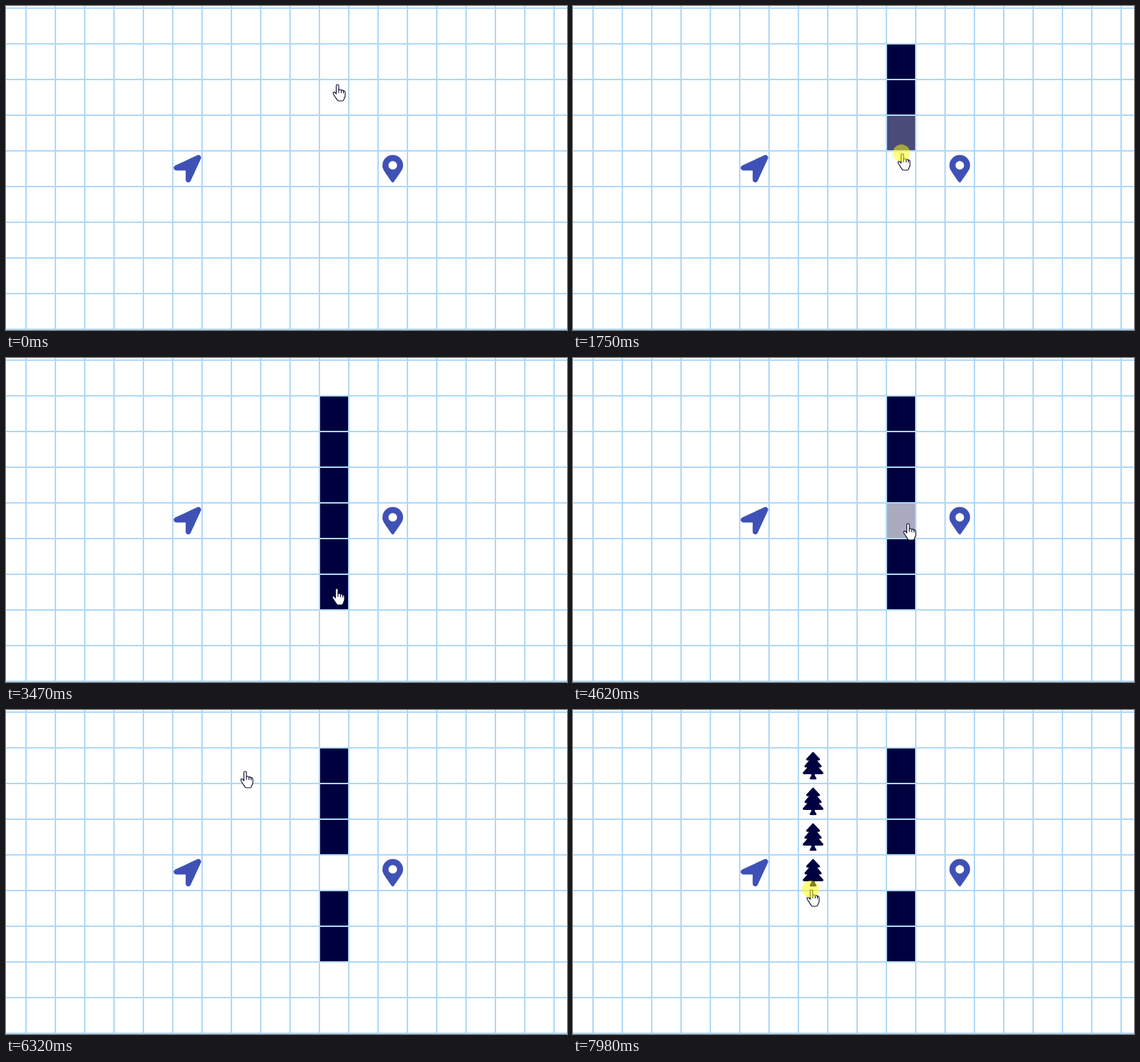
These frames come from a looping animation (784 px wide and 454 px high, 8000 ms). An HTML page:

```html
<!DOCTYPE html>
<html lang="en">
<head>
<meta charset="utf-8">
<title>Grid walls</title>
<style>
  html, body { margin: 0; width: 100%; height: 100%; overflow: hidden; background: #fff; }
  svg { display: block; }
</style>
</head>
<body>
<svg width="784" height="454" viewBox="0 0 784 454">
  <defs>
    <path id="tree" fill="#000040" transform="scale(.075)" d="M378 378L298 288h31c9 0 17-5 21-13s2-17-4-24L268 160h29c9 0 17-5 21-14s2-17-4-24L204 5c-6-6-18-6-24 0L70 122c-6 7-8 16-4 24s12 14 21 14h29l-79 91c-5 7-7 16-3 24s12 13 21 13h31L6 378c-6 7-8 17-4 25s12 13 21 13H160v24l-30 49c-5 10 2 23 14 23h96c12 0 20-13 14-23L224 440V416h137c9 0 17-5 21-13s2-18-4-25z"/>
  </defs>
  <path id="grid" stroke="#afd8f8" stroke-width="2"/>
  <g id="walls" fill="#000040"></g>
  <g fill="#3f51b5">
    <path transform="translate(234.3 208.8) scale(.075)" d="M444 4L29 195c-48 23-32 93 19 93h176v176c0 51 70 67 93 19L509 67c16-38-26-80-65-63z"/>
    <path transform="translate(526.1 208.8) scale(.075)" d="M172 502C27 291 0 269 0 192a192 192 0 0 1 384 0c0 77-27 99-172 310-10 13-30 13-40 0zM192 272a80 80 0 1 0 0-160 80 80 0 0 0 0 160z"/>
  </g>
  <g id="trees"></g>
  <g id="hand" stroke="#0b0b28" stroke-width="1.1" stroke-linejoin="round" stroke-linecap="round">
    <path fill="#fff" d="M5 13.700V2.300a1.750 1.750 0 0 1 3.500 0V7.600q3.200-.6 3.500.9q2.600-.5 3 .9q2.500-.2 2.500 2.200v4.400q0 1.800-1 3.400l-1 2.400q-.5 1.700-2 1.700H8.300q-1.300 0-2-1.400L1 14q-1-1.800.3-2.700q1.300-.7 2.400.8z"/>
    <path fill="none" d="M8.500 7.600v4.200M12 8.500v3.500M15 9.400v3"/>
  </g>
  <circle id="press" r="12" fill="#ff0" fill-opacity=".5"/>
</svg>
<script>
const LOOP = 8000, FADE = 500, ROW = 50, COL = 41;
const WALLS = 6, TREES = 4, GAP = 3;

const $ = id => document.getElementById(id);
const clamp = v => Math.max(0, Math.min(1, v));
const smooth = u => u * u * (3 - 2 * u);
const easeOut = u => u * (2 - u);
const within = (t, start, end) => t >= start && t < end;
const fade = (t, start) => smooth(clamp((t - start) / FADE));

// Fingertip moves, each starting where the previous one ended
const moves = [
  { start: 0, end: 310, x: 459, y: 85, ease: easeOut },
  { start: 680, end: 2850, x: 461, y: 333, ease: smooth, sway: 6 },
  { start: 3430, end: 4260, x: 468, y: 232, ease: easeOut },
  { start: 5250, end: 6250, x: 334, y: 86, ease: smooth },
  { start: 7020, end: 8080, x: 333, y: 256, ease: smooth }
];

const wallTime = i => 720 + 355 * i;
const treeTime = i => 6870 + 285 * i;
const eraseTime = 4315;

function tipAt(t) {
  let x = 463, y = 110;
  for (const m of moves) {
    const u = clamp((t - m.start) / (m.end - m.start)), p = m.ease(u);
    x += (m.x - x) * p - (m.sway || 0) * Math.sin(2 * Math.PI * u);
    y += (m.y - y) * p;
  }
  return [Math.round(x), Math.round(y)];
}

const pressed = t =>
  within(t, 610, 2920) || within(t, eraseTime, 4500) || within(t, 6800, LOOP);

function add(parent, tag, attrs) {
  const el = document.createElementNS("http://www.w3.org/2000/svg", tag);
  for (const k in attrs) el.setAttribute(k, attrs[k]);
  return $(parent).appendChild(el);
}

const rows = (n, make) => Array.from({ length: n }, (_, i) => make(i));
const show = (el, on) => el.style.display = on ? "" : "none";
const place = (id, x, y) => $(id).setAttribute("transform", `translate(${x} ${y})`);

let lines = "";
for (let x = 28; x < 784; x += COL) lines += `M${x} 0V454`;
for (let y = 3; y < 454; y += ROW) lines += `M0 ${y}H784`;
$("grid").setAttribute("d", lines);

const walls = rows(WALLS, i =>
  add("walls", "rect", { x: 439, y: 54 + ROW * i, width: COL - 2, height: ROW - 2 }));
const trees = rows(TREES, i =>
  add("trees", "use", { href: "#tree", x: 321.1, y: 58.8 + ROW * i }));

function draw(t) {
  const [x, y] = tipAt(t);
  place("hand", x - 6.5, y - 0.5);
  place("press", x - 1, y - 1);
  show($("press"), pressed(t));
  walls.forEach((wall, i) => {
    const cleared = i === GAP ? fade(t, eraseTime) : 0;
    wall.style.opacity = fade(t, wallTime(i)) - cleared;
  });
  trees.forEach((tree, i) => show(tree, t >= treeTime(i)));
}

const origin = performance.now();
function tick() {
  draw((performance.now() - origin) % LOOP);
  requestAnimationFrame(tick);
}
tick();
</script>
</body>
</html>
```
